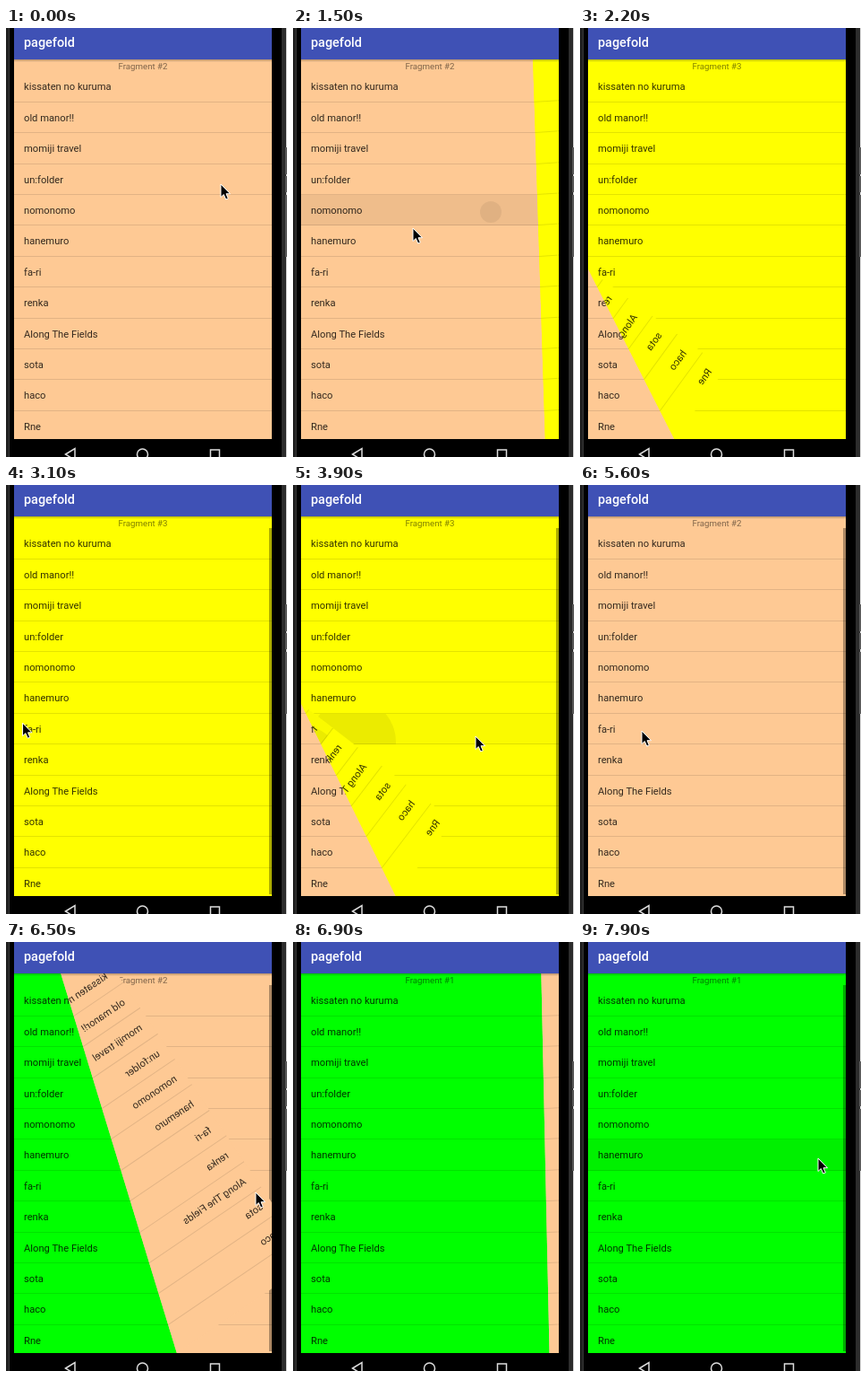
Write an HTML page that moves like this. It is 314x478 px and loops after 8 s.

```html
<!DOCTYPE html>
<html lang="en">
<head>
<meta charset="utf-8">
<title>pagefold</title>
<style>
  html, body { margin: 0; width: 100%; height: 100%; overflow: hidden; background: #000; }
  body { font-family: Roboto, "Noto Sans", sans-serif; }
  #stage { position: relative; width: 314px; height: 478px; overflow: hidden; background: #000; }
  #stage > * { position: absolute; }
  .chrome { left: 0; top: 0; }
  header {
    left: 9px; top: 0; width: 288px; height: 35px; background: #3f51b5;
    color: #fff; font: 500 14.4px/34px Roboto, "Noto Sans", sans-serif; text-indent: 11px;
  }
  #view { left: 9px; top: 35px; width: 288px; height: 423px; overflow: hidden; }
  #view::after {
    content: ""; position: absolute; left: 0; top: 0; width: 100%; height: 3px;
    background: linear-gradient(rgba(0,0,0,.28), transparent);
  }
  .page {
    position: absolute; left: 0; top: 0; width: 288px; height: 423px;
    overflow: hidden; transform-origin: 0 0;
  }
  .page > * { position: absolute; }
  .p1 { background: #0f0; }
  .p2 { background: #fec994; }
  .p3 { background: #ff0; }
  .label {
    left: 0; top: 1px; width: 100%; text-align: center;
    font-size: 9.7px; line-height: 14px; color: rgba(0,0,0,.5);
  }
  .row {
    left: 0; width: 100%; height: 34.4px; box-sizing: border-box; padding-left: 11px;
    border-bottom: 1px solid rgba(0,0,0,.11);
    font-size: 11.2px; line-height: 36.4px; white-space: nowrap; color: rgba(0,0,0,.8);
  }
  .press { left: 0; width: 100%; height: 34.4px; overflow: hidden; }
  .ripple { position: absolute; border-radius: 50%; background: rgba(0,0,0,.06); }
  .bar { left: 285px; top: 13px; width: 3px; height: 408px; background: rgba(0,0,0,.33); }
  #cursor { left: 0; top: 0; overflow: visible; }
</style>
</head>
<body>
<div id="stage">
  <svg class="chrome" width="314" height="478">
    <rect width="3" height="478" fill="#202020"/>
    <rect x="3" width="1" height="478" fill="#3a3a3a"/>
    <rect x="308" width="5" height="478" fill="#2c2c2c"/>
    <rect x="313" width="1" height="478" fill="#ddd"/>
    <g fill="#5a5a5a">
      <rect x="312" y="133" width="2" height="30"/>
      <rect x="312" y="165" width="2" height="18"/>
      <rect x="312" y="186" width="2" height="69"/>
    </g>
    <g fill="none" stroke="#ddd" stroke-width="1.5">
      <path d="M66.500 475L77 468.500V481.500Z"/>
      <circle cx="152.500" cy="475" r="6"/>
      <rect x="228.500" y="470" width="10" height="10"/>
    </g>
  </svg>
  <header>pagefold</header>
  <div id="view"></div>
  <svg id="cursor" width="12" height="18">
    <path d="M0 0V14.500L3.300 11.500L5.700 17L8.300 16L6 10.700H10.500Z"
          fill="#000" stroke="#fff" stroke-width="1"/>
  </svg>
</div>
<script>
const LOOP = 8000, STEP = 100;
const W = 288, H = 423, TOP = 13.4, ROW = 34.4;
const LIFT = 105;   // how high the turned corner rises
const SWAP = 5000;  // from here on the next pair of pages is used
const items = ["kissaten no kuruma", "old manor!!", "momiji travel", "un:folder", "nomonomo",
  "hanemuro", "fa-ri", "renka", "Along The Fields", "sota", "haco", "Rne"];

// time, x, y of the mouse: rest and three swipes
const stops = [[0, 240, 174], [300, 228, 191], [900, 228, 191], [1500, 134, 223], [2200, -20, 260],
  [2800, -20, 260], [3500, 70, 272], [3900, 204, 280], [4400, 296, 293], [4700, 318, 293],
  [5600, 69, 274], [5900, 69, 274], [6500, 279, 279], [6900, 318, 276], [7800, 266, 241]];

const presses = [
  { page: 2, row: 4, from: 1000, to: 1800, x: 212, y: 19, r: 12, shade: .06 },
  { page: 3, row: 6, from: 3500, to: 4000, x: 58, y: 31, r: 48, shade: .02 },
  { page: 1, row: 5, from: 7700, to: LOOP, x: 258, y: 20, r: 0, shade: .06 }
];
const barFrom = { 1: 7000, 2: SWAP, 3: 2500 };

const view = document.getElementById("view");
const cursor = document.getElementById("cursor");

function smooth(t, start, span) {
  const k = Math.min(1, Math.max(0, (t - start) / span));
  return k * k * (3 - 2 * k);
}

// 0 = upper page lies flat, 1 = turned away
function turn(t) {
  if (t < 3000) return 1 - smooth(t, 1311, 1344);
  return t < SWAP ? smooth(t, 3460, 1222) : smooth(t, 5838, 1200);
}

function mouse(t) {
  const i = stops.findIndex(s => s[0] > t);
  if (i < 0) return stops[stops.length - 1].slice(1);
  const [t0, x0, y0] = stops[i - 1], [t1, x1, y1] = stops[i];
  const k = (t - t0) / (t1 - t0);
  return [x0 + (x1 - x0) * k, y0 + (y1 - y0) * k];
}

function add(parent, cls, text = "") {
  const el = document.createElement("div");
  el.className = cls;
  el.textContent = text;
  parent.append(el);
  return el;
}

function makePage() {
  const el = add(view, "page");
  const label = add(el, "label");
  const press = add(el, "press");
  const ripple = add(press, "ripple");
  items.forEach((name, i) => add(el, "row", name).style.top = TOP + i * ROW + "px");
  return { el, label, press, ripple, bar: add(el, "bar") };
}

function fillPage(p, n, t) {
  p.el.className = "page p" + n;
  p.label.textContent = "Fragment #" + n;
  p.bar.hidden = t < barFrom[n];
  const hit = presses.find(h => h.page === n && t >= h.from && t < h.to);
  p.press.hidden = !hit;
  if (!hit) return;
  const r = hit.r * Math.min(1, .3 + (t - hit.from) / 500);
  p.press.style.top = TOP + hit.row * ROW + "px";
  p.press.style.background = `rgba(0,0,0,${hit.shade})`;
  Object.assign(p.ripple.style, {
    left: hit.x - r + "px", top: hit.y - r + "px", width: 2 * r + "px", height: 2 * r + "px"
  });
}

// half plane beside the crease, on the side that (nx, ny) * side points to
function half(mx, my, nx, ny, side) {
  const far = 1500;
  const pts = [[-1, 0], [1, 0], [1, side], [-1, side]].map(([a, b]) =>
    `${(mx + far * (b * nx - a * ny)).toFixed(2)}px ${(my + far * (b * ny + a * nx)).toFixed(2)}px`);
  return `polygon(${pts.join(",")})`;
}

const under = makePage(), upper = makePage(), flap = makePage();

function fold(u) {
  const folding = u > 0 && u < 1;
  upper.el.style.visibility = u < 1 ? "visible" : "hidden";
  flap.el.style.visibility = folding ? "visible" : "hidden";
  upper.el.style.clipPath = "none";
  if (!folding) return;
  // the crease halves the way from the bottom left corner to its turned place
  const dx = 2 * W * u, dy = -LIFT * Math.sin(Math.PI * u), len = Math.hypot(dx, dy);
  const nx = dx / len, ny = dy / len, mx = dx / 2, my = H + dy / 2;
  const d = 2 * (mx * nx + my * ny);
  upper.el.style.clipPath = half(mx, my, nx, ny, 1);
  flap.el.style.clipPath = half(mx, my, nx, ny, -1);
  const m = [1 - 2 * nx * nx, -2 * nx * ny, -2 * nx * ny, 1 - 2 * ny * ny, d * nx, d * ny];
  flap.el.style.transform = `matrix(${m.map(v => v.toFixed(5)).join(",")})`;
}

function draw(now) {
  const t = Math.floor(now % LOOP / STEP) * STEP;
  const low = t < SWAP ? 2 : 1;
  fillPage(under, low, t);
  fillPage(upper, low + 1, t);
  fillPage(flap, low + 1, t);
  fold(turn(t));
  const [x, y] = mouse(t);
  cursor.style.transform = `translate(${x}px,${y}px)`;
}

const start = performance.now();
function tick() {
  draw(performance.now() - start);
  requestAnimationFrame(tick);
}
tick();
</script>
</body>
</html>
```
